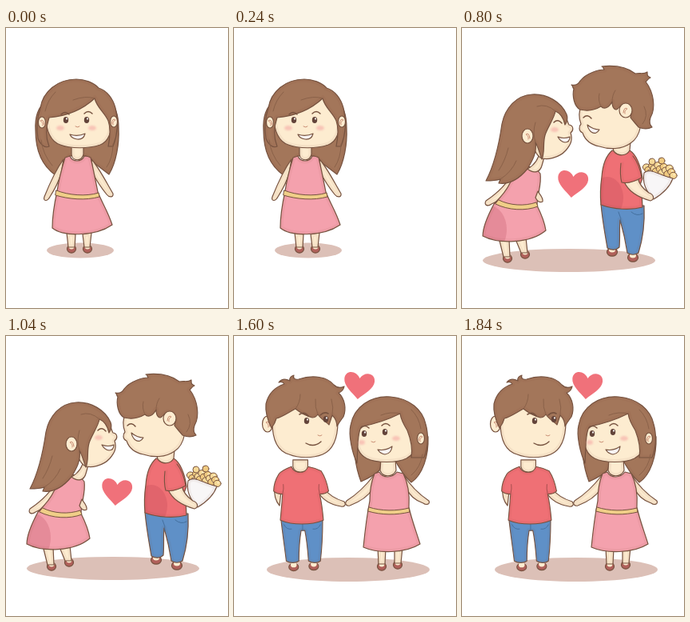
These frames come from a looping animation (278x350 px, 2 s). An HTML page with a canvas:

```html
<!DOCTYPE html>
<html lang="en">
<head>
<meta charset="utf-8">
<title>Couple</title>
<style>
html, body { margin: 0; width: 100%; height: 100%; overflow: hidden; background: #fff; }
canvas { display: block; width: 278px; height: 350px; }
</style>
</head>
<body>
<canvas id="stage"></canvas>
<script>
const W = 278, H = 350, HOLD = 400;
const stage = document.getElementById('stage');
const dpr = window.devicePixelRatio || 1;
stage.width = W * dpr;
stage.height = H * dpr;
const c = stage.getContext('2d');

const LINE = '#76523f', HAIR = '#a3765a', SKIN = '#fdecd0', PINK = '#f4a1ad', RED = '#ef7075',
  JEANS = '#5f90c7', BELT = '#f7d88e', SHOE = '#b0605a', SHADOW = '#dcc0b7', HEART = '#f0717a',
  STRAND = '#8a6149';

// shade: [x, y, rx, ry] of a darker area inside the shape
function ink(d, fill, w = 1.2, shade) {
  const p = new Path2D(d);
  c.fillStyle = fill;
  c.fill(p);
  c.save();
  c.clip(p);
  if (shade) oval(...shade, 'rgba(170,50,70,.2)');
  c.strokeStyle = 'rgba(120,60,40,.06)';
  c.lineWidth = 7;
  c.stroke(p);
  c.restore();
  c.strokeStyle = LINE;
  c.lineWidth = w;
  c.stroke(p);
}

function line(d, w = 1.2, color = LINE) {
  c.strokeStyle = color;
  c.lineWidth = w;
  c.stroke(new Path2D(d));
}

function oval(x, y, rx, ry, fill, outline = 0) {
  c.beginPath();
  c.ellipse(x, y, rx, ry, 0, 0, Math.PI * 2);
  c.fillStyle = fill;
  c.fill();
  if (outline) {
    c.strokeStyle = LINE;
    c.lineWidth = outline;
    c.stroke();
  }
}

function placed(draw, x, y, sx = 1, sy = sx) {
  c.save();
  c.translate(x, y);
  c.scale(sx, sy);
  draw();
  c.restore();
}

const shadow = (x, y, rx, ry) => oval(x, y, rx, ry, SHADOW);
const skin = d => ink(d, SKIN);
const hair = d => ink(d, HAIR);
const strands = d => line(d, 1, STRAND);
const nose = (x, y) => line(`M${x} ${y}q3 2 5 0`, 1, '#c98d73');

function ear(x, y, rx, ry, side = 1) {
  oval(x, y, rx, ry, SKIN, 1.2);
  line(`M${x - 3 * side} ${y + 3}q${side} ${-8} ${5 * side} -5q${-4 * side} 2 ${-3 * side} 6`, 1, '#c98d73');
}

function eye(x, y) {
  oval(x, y, 3.2, 4.1, '#63443a');
  oval(x + 1, y - 1.6, 1, 1.2, '#fff');
}

function cheek(x, y, rx = 5, ry = 3) {
  c.save();
  c.filter = 'blur(.8px)';
  oval(x, y, rx, ry, '#f8c4b6');
  c.restore();
}

const brow = (x, y, lift = -3) => line(`M${x - 5} ${y + 2}q5 ${lift - 2} 10 0`, 1.5);
const grin = d => ink(d, '#fff');

function shoe(x, y, rx = 6.5) {
  oval(x, y, rx, 5.2, SHOE, 1.2);
  oval(x, y - 3, rx * .62, 3.6, SKIN);
}

function heart(x, y, scale = 1, turn = 0) {
  c.save();
  c.translate(x, y);
  c.rotate(turn);
  c.scale(scale, scale);
  c.fillStyle = HEART;
  c.fill(new Path2D('M0 17C-8 9 -19 2 -19 -7C-19 -18 -5 -19 0 -9C5 -19 19 -18 19 -7C19 2 8 9 0 17Z'));
  c.restore();
}

function boyLegs() {
  shoe(175, 285);
  shoe(202, 284);
  ink('M158 222C160 240 163 260 165 277C170 280 178 280 182 277C182 262 183 248 185 236H190C193 250 194 264 195 277C200 280 207 280 211 277C213 260 214 240 214 222Z', JEANS);
  line('M162 228Q165 235 172 234M211 228Q208 235 201 234M187 226V236', 1, '#44709f');
}

function boyShirt() {
  ink('M172 150C164 153 158 156 155 160C150 168 148 176 148 183C151 186 156 187 160 187C159 200 158 212 157 222C174 229 198 229 215 222C214 210 212 196 210 187C215 187 219 186 222 183C220 172 216 162 212 156C206 153 200 151 194 150C190 160 176 160 172 150Z', RED);
  line('M160 187Q162 180 161 174M210 187Q208 180 209 174', 1.1, '#a85050');
  skin('M174 141V150C176 160 192 160 194 150V141Z');
}

function boyBody() {
  boyLegs();
  boyShirt();
}

function boyHead(bothEars) {
  ear(139, 107, 6.5, 10, -1);
  if (bothEars) ear(231, 106, 6.5, 10);
  skin('M145 105C145 128 152 141 166 145C178 150 196 150 208 145C222 139 227 122 227 104C226 86 210 74 186 74C162 74 146 86 145 105Z');
  hair('M144 112C139 102 136 92 137 82C140 68 150 60 160 57C158 54 155 54 153 55C157 50 163 51 167 53C166 50 168 47 172 46C170 50 174 52 178 51C196 45 214 48 222 58C226 62 231 62 235 60C234 65 231 67 228 68C236 76 238 88 234 98C231 102 228 106 226 110C226 104 224 100 220 96L216 108C212 104 206 101 202 95C200 98 197 99 195 99C188 97 180 93 174 88C166 92 158 98 150 100C149 104 147 108 144 112Z');
  strands('M174 88Q180 80 180 70M202 95Q198 86 199 76M220 96Q222 86 219 76');
}

function girlAlone() {
  shadow(93, 278, 42, 9.5);
  hair('M50 92C40 98 36 112 37 128C37 148 42 170 62 184L72 168 80 160H100L112 170 129 183C138 168 142 145 141 125C141 108 136 96 128 90Z');
  shoe(82, 276, 5.5);
  shoe(102, 276, 5.5);
  skin('M76 256L78 274H86L87 258Z');
  skin('M96 258L98 274H105L107 256Z');
  skin('M72 164C62 178 54 196 48 211C46 217 52 217 55 211C62 200 66 192 69 182Z');
  skin('M107 164C116 174 124 190 134 207C135 212 129 212 126 208C118 198 113 190 109 182Z');
  ink('M74 162C70 175 66 190 64 204C60 222 58 238 58 250C70 260 110 262 133 246C128 230 120 218 115 205C112 190 109 175 106 162C103 160 100 160 98 160C95 168 83 168 80 160Z', PINK);
  ink('M63 203C78 209 100 211 116 206L117 211C100 216 78 214 62 209Z', BELT, 1);
  skin('M82 147V158C83 167 95 167 97 158V147Z');
  skin('M50 112C50 128 56 142 68 146C80 151 104 151 118 146C128 142 133 130 132 112C130 90 112 80 92 80C70 80 50 92 50 112Z');
  hair('M88 64C64 64 46 80 43 100C39 112 38 126 40 138C44 148 50 150 54 148C50 138 49 126 54 112C76 110 96 102 111 88C114 100 124 106 128 116C131 124 130 138 128 148L134 148C141 130 140 112 137 100C134 88 126 78 116 75C110 68 98 64 88 64Z');
  strands('M111 88Q100 84 84 90M44 140Q46 158 58 172M134 145Q134 162 126 174M62 80Q52 90 49 104');
  ear(45, 118, 4.5, 7, -1);
  ear(135, 117, 4.5, 7);
  brow(74, 106);
  brow(103, 105);
  eye(75, 115);
  eye(101, 115);
  nose(87, 123);
  cheek(68, 125);
  cheek(108, 125);
  grin('M80 133Q90 136 99 132Q97 140 89 139Q82 138 80 133Z');
}

function boyAlone() {
  shadow(189, 287, 43, 11);
  skin('M153 185C149 198 146 212 143 224C144 229 149 229 151 223C154 212 157 200 160 187Z');
  skin('M212 186C214 200 218 212 222 221C226 225 231 223 229 217C226 206 222 194 220 184Z');
  boyBody();
  boyHead(true);
  brow(168, 96);
  brow(197, 95);
  eye(170, 106);
  eye(196, 105);
  nose(180, 118);
  grin('M174 126Q184 129 192 125Q191 133 183 132Q177 132 174 126Z');
}

function popcorn() {
  for (let i = 0; i < 15; i++) {
    const x = 231 + i * 2.4, y = 171 + i % 3 * 4 + Math.abs(i - 5) * .6;
    oval(x, y, 4.6, 4.1, i % 2 ? '#f0ca80' : '#f6d896', 1);
    oval(x + 1, y - 1, 1.4, 1, '#fff0c8');
  }
  oval(238, 167, 4, 4, '#f6d896', 1);
  oval(250, 166, 4, 4, '#f0ca80', 1);
  ink('M228 181C236 174 246 184 264 188C260 200 250 208 240 214C232 206 225 196 228 181Z', '#f8f6f7', 1.1);
}

function leaning() {
  shadow(134, 290.5, 108, 14.5);

  skin('M64 180C56 196 42 208 30 216C27 221 32 224 37 220C52 213 66 206 74 194Z');
  shoe(57, 288, 5.5);
  shoe(79, 283, 5.5);
  skin('M46 262L52 286H60L59 264Z');
  skin('M67 264L74 281H82L80 262Z');
  ink('M78 172C70 180 64 186 60 194C55 205 47 213 40 220C32 235 26 248 26 260C45 270 85 270 105 253C103 240 98 230 94 222C94 208 100 196 98 182C94 176 88 174 78 172Z', PINK, 1.2, [34, 252, 22, 30]);
  ink('M46 215C60 222 78 223 93 218L95 223C80 229 58 228 42 220Z', BELT, 1);
  skin('M95 204C97 208 102 212 101 217C97 219 94 216 92 212Z');
  skin('M98 152C96 165 90 172 82 176C90 183 98 180 100 172L104 158Z');
  skin('M92 110C104 98 122 98 128 104C131 112 132 118 134 121C140 122 140 128 136 131C139 140 136 146 130 153C122 162 106 166 98 162C88 155 84 130 92 110Z');
  hair('M50 120C54 100 68 84 88 83C106 82 124 92 131 108C133 113 131 118 129 121C127 112 122 106 117 104C115 114 107 124 104 134C101 144 104 156 100 164C97 156 95 148 92 143C94 156 88 166 82 176C72 188 60 196 46 194L48 189C42 191 36 191 30 191C40 172 46 148 50 120Z');
  strands('M117 104Q106 94 94 98M48 189Q62 180 68 166M92 143Q88 130 92 118M58 150Q54 166 46 178');
  ear(82, 135, 7, 9, -1);
  line('M115 118q5 -5 10 1', 1.5);
  cheek(116, 127);
  grin('M120 136Q128 139 135 136Q135 143 129 143Q123 142 120 136Z');

  shoe(188, 280, 6.5);
  shoe(214, 287, 6.5);
  ink('M174 220C176 243 180 262 182 275C187 278 193 278 197 274C198 262 197 250 198 240C202 254 205 268 207 281C211 284 217 284 221 281C227 262 229 244 228 222Z', JEANS);
  line('M196 230Q200 238 199 244M212 230Q219 236 226 232', 1, '#44709f');
  ink('M188 153C180 160 176 172 175 186C173 200 173 210 174 221C190 227 212 228 226 224C226 214 225 205 223 196L226 188C224 172 218 158 210 153C202 156 196 156 188 153Z', RED, 1.2, [182, 212, 20, 26]);
  popcorn();
  skin('M203 192C208 204 222 212 236 216C242 214 240 208 234 206C228 202 222 196 220 187Z');
  ink('M199 169C198 178 198 186 200 193C209 195 218 191 225 187C223 176 219 166 214 160', RED, 1.1);
  skin('M188 146L190 154C196 161 206 160 210 153L211 142Z');
  skin('M150 96C146 104 146 112 149 120C146 123 146 129 151 131C154 140 162 146 172 148C184 152 200 152 211 144C224 136 228 114 222 90C200 76 165 76 150 96Z');
  hair('M148 102C140 98 138 84 140 76C138 74 139 72 137 71C142 72 146 70 148 66C156 56 172 52 178 52C176 50 178 49 175 48C194 46 208 50 217 57C224 56 228 58 232 55C232 60 232 60 236 62C232 64 232 66 230 67C240 80 243 100 236 112C234 118 236 122 238 124C232 127 226 126 221 124C218 120 214 116 211 112C214 100 206 90 198 98C192 106 188 100 188 92C184 100 178 102 174 98C164 104 156 104 148 102Z');
  strands('M174 98Q170 90 172 82M188 92Q188 84 192 78M226 120Q234 110 228 98');
  ear(205, 103, 8, 9);
  line('M152 112q5 -5 10 1', 1.5);
  grin('M157 121Q164 127 172 127Q168 134 162 130Q158 127 157 121Z');

  heart(138.5, 195, 1, .1);
}

function kissing() {
  shadow(138, 297, 92, 15);

  skin('M148 196C145 206 142 214 138 220C137 228 143 230 147 226C150 214 153 206 154 198Z');
  skin('M206 197C210 208 214 218 219 225C224 228 229 225 227 219C222 208 218 200 214 195Z');
  placed(boyLegs, -17, -13, 1.05, 1.08);
  placed(boyShirt, -3, 27, .98, .9);
  ear(232, 119, 7, 9);
  skin('M142 112C140 130 146 146 158 152C170 158 192 158 204 153C218 146 226 130 226 112C224 92 208 82 184 82C160 82 144 92 142 112Z');
  hair('M143 113C138 100 140 84 146 74C152 66 158 62 166 59C164 57 162 56 160 55C165 52 168 54 171 55C170 51 168 49 167 46C171 50 176 52 180 52C200 48 220 56 229 68C237 76 239 88 238 92C240 94 242 94 243 93C241 98 238 99 236 100C234 106 230 110 224 114C224 108 222 104 218 102C218 105 217 107 214 110C208 107 202 103 199 96C192 100 182 97 176 91C168 95 158 101 147 102C146 106 145 109 143 113Z');
  strands('M176 91Q180 80 178 68M199 96Q196 86 198 76M218 102Q222 90 219 78');
  line('M153 110q7 -6 14 1M189 108q7 -7 15 0', 1.6);
  nose(178, 120);
  grin('M177 131Q186 133 193 129Q193 137 186 138Q180 137 177 131Z');

  shoe(86, 295, 5.5);
  shoe(107, 291, 5.5);
  skin('M80 272L83 293H91L90 272Z');
  skin('M99 274L103 289H110L108 272Z');
  hair('M108 154C118 162 130 160 138 152C134 164 128 174 121 186L110 180Z');
  ink('M100 178C90 186 84 196 80 206C76 214 73 218 70 222C58 230 48 238 46 242C54 256 64 264 68 270C80 278 100 278 114 276C120 264 124 250 122 238C126 222 128 206 128 192C122 184 112 180 100 178Z', PINK, 1.2, [108, 266, 32, 24]);
  ink('M72 217C84 229 104 235 123 233V238C104 241 82 235 69 222Z', BELT, 1);
  skin('M104 154C106 166 102 174 100 180C108 187 116 186 118 178L116 158Z');
  skin('M100 186C106 200 120 216 138 228C142 224 143 219 139 216C126 206 120 196 116 184Z');
  skin('M98 112C110 100 130 102 138 112C144 116 148 120 147 124C149 130 147 134 146 140C142 152 130 160 118 161C104 160 94 140 98 112Z');
  hair('M58 120C62 100 78 86 98 85C114 84 132 92 138 106C140 112 140 115 138 118C134 110 129 106 125 105C122 116 110 128 107 142C104 152 108 160 106 167C102 158 102 148 98 144C98 158 104 172 98 186C92 196 82 204 72 208V203C66 206 60 206 54 206C60 180 56 150 58 120Z');
  strands('M125 105Q114 96 102 100M72 203Q82 190 84 174M98 144Q94 132 98 120M66 148Q68 168 62 188');
  ear(88, 137, 7, 9, -1);
  line('M126 113q5 3 9 -1', 1.5);
  cheek(126, 121, 5, 3.5);

  heart(85, 46, 1.15, -.16);
}

function holdingHands() {
  shadow(143, 292, 102, 15);

  skin('M51 190C50 198 52 206 57 212L59 194Z');
  skin('M112 190C118 198 128 204 138 207C141 211 138 214 134 213C122 211 112 206 106 196Z');
  placed(boyBody, -88, 23.7, .93);
  placed(boyHead, -97, 3);
  line('M82 98q6 -4 11 2M108 99q5 -5 10 -2', 1.6);
  eye(91, 106);
  eye(115, 104);
  nose(105, 124);
  line('M90 134Q100 140 109 132', 1.4);

  hair('M152 112C148 138 152 164 159 182C168 178 176 174 182 168L188 152H200C206 164 214 176 222 183C236 174 244 150 243 126L230 100Z');
  shoe(185, 288, 5.5);
  shoe(205, 286, 5.5);
  skin('M180 264L181 285H189L190 266Z');
  skin('M201 266V284H209L211 264Z');
  skin('M176 173C166 186 154 198 141 206C138 210 141 213 145 212C158 207 168 200 173 192Z');
  skin('M212 173C220 186 232 198 244 206C246 210 241 212 237 209C228 206 220 200 216 190Z');
  ink('M176 172C172 182 170 194 170 206C168 216 164 244 162 264C180 272 214 272 233 260C228 244 222 228 219 214C220 200 218 184 212 172L204 170C198 178 186 178 182 170Z', PINK);
  ink('M169 214C184 219 204 219 219 215L220 220C204 224 184 224 168 219Z', BELT, 1);
  skin('M184 153L183 168C186 177 199 177 203 168L202 153Z');
  skin('M152 122C152 136 156 148 166 153C178 159 204 159 216 153C228 146 234 134 232 118C228 100 212 90 192 90C170 92 154 104 152 122Z');
  hair('M146 112C150 88 172 74 196 76C220 78 236 92 240 110C244 124 243 140 238 152L222 152C224 140 221 128 217 118C212 110 209 104 208 97C194 104 176 110 160 113C155 118 155 138 154 159C148 146 143 124 146 112Z');
  strands('M208 97Q196 94 184 99M236 148Q234 164 222 174M222 92Q232 102 234 116');
  ear(234, 128, 4.5, 7);
  brow(164, 113);
  brow(190, 110);
  eye(163, 122);
  eye(189, 120);
  nose(172, 132);
  cheek(160, 133, 4, 3);
  cheek(203, 128);
  grin('M180 142Q189 144 198 138Q197 147 189 148Q183 147 180 142Z');

  heart(156.5, 62, 1, .1);
}

const scenes = [girlAlone, boyAlone, leaning, kissing, holdingHands];
let shown = -1;

function render(now) {
  const index = Math.floor(now / HOLD) % scenes.length;
  if (index !== shown) {
    shown = index;
    c.setTransform(dpr, 0, 0, dpr, 0, 0);
    c.fillStyle = '#fff';
    c.fillRect(0, 0, W, H);
    c.lineCap = c.lineJoin = 'round';
    scenes[index]();
  }
}

const start = performance.now();
function tick() {
  render(performance.now() - start);
  requestAnimationFrame(tick);
}
tick();
</script>
</body>
</html>
```
